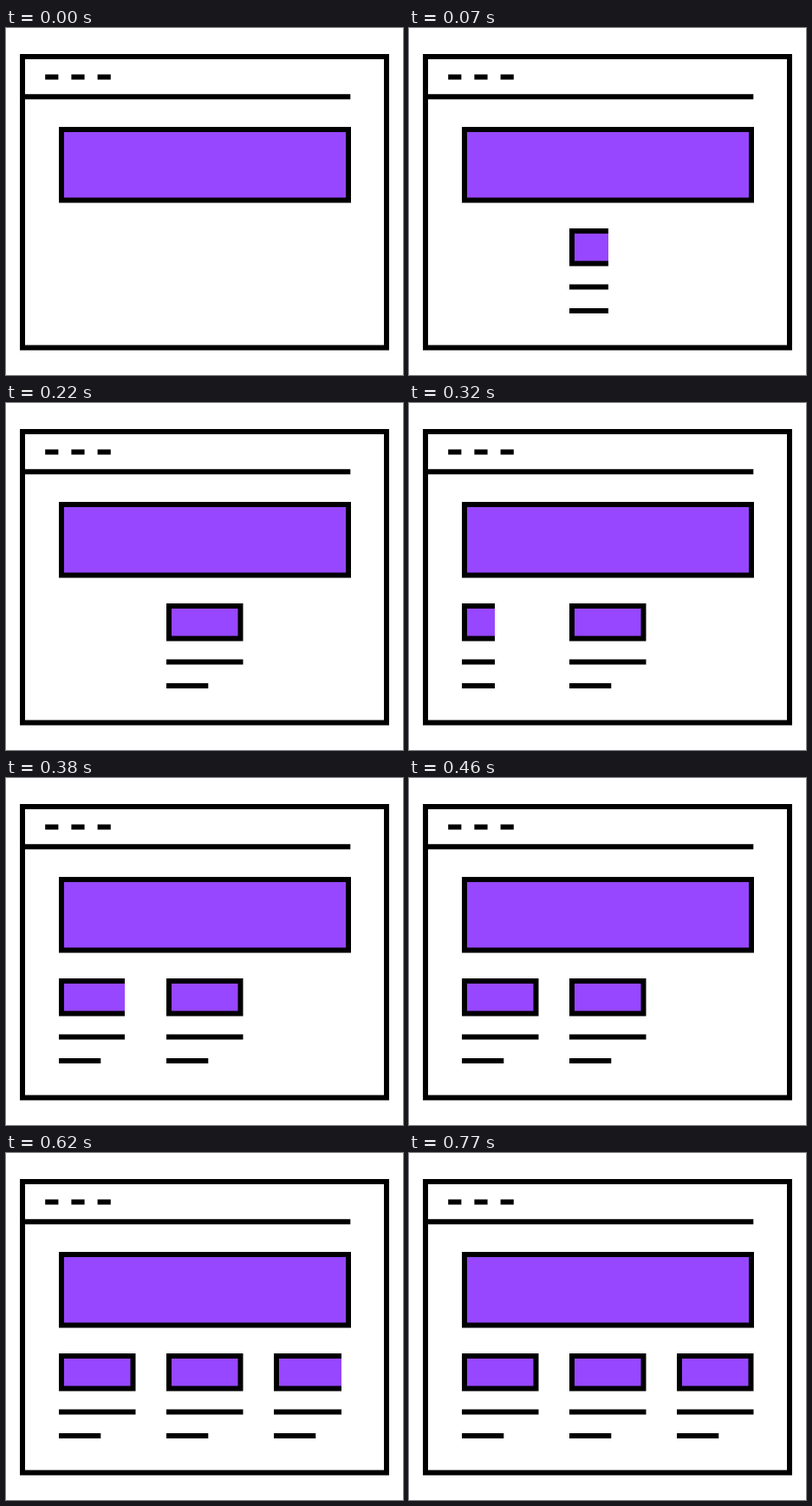
These frames come from a looping animation (458x400 px, 1.77 s). An HTML page:

```html
<!DOCTYPE html>
<html lang="en">
<head>
<meta charset="utf-8">
<title>Page layout building up</title>
<style>
  html, body { margin: 0; width: 100%; height: 100%; overflow: hidden; background: #fff; }
  svg { display: block; width: 458px; height: 400px; }
  .box, .line { stroke: #000; stroke-width: 6; fill: none; }
  .filled { fill: #9747ff; }
</style>
</head>
<body>
<svg viewBox="0 0 458 400">
  <defs>
    <clipPath id="wipe-left"><rect y="225" x="56" height="110"/></clipPath>
    <clipPath id="wipe-middle"><rect y="225" x="180" height="110"/></clipPath>
    <clipPath id="wipe-right"><rect y="225" x="304" height="110"/></clipPath>
    <g id="card">
      <rect class="box filled" x="3" y="234" width="82.5" height="37.5"/>
      <path class="line" d="M0 298.5H88.5M0 326H48.3"/>
    </g>
  </defs>
  <rect class="box" x="19" y="33" width="420" height="335.5"/>
  <path class="line" d="M45.2 56.5h15.2m15 0h15.2m15 0h15.2M20 79.2H397.3"/>
  <rect class="box filled" x="64" y="117" width="331" height="81.5"/>
  <g clip-path="url(#wipe-left)"><use href="#card" x="61"/></g>
  <g clip-path="url(#wipe-middle)"><use href="#card" x="185"/></g>
  <g clip-path="url(#wipe-right)"><use href="#card" x="309"/></g>
</svg>
<script>
  const LOOP = 1770;
  const MARGIN = 5;
  const FULL = 90;

  // Each wipe holds its visible width from the given time until the next step.
  const wipes = {
    middle: [[70, 45], [160, FULL]],
    left: [[320, 38], [380, 76], [460, FULL]],
    right: [[540, 19], [620, 78], [700, FULL]]
  };

  const clips = Object.entries(wipes).map(([name, steps]) => ({
    rect: document.querySelector(`#wipe-${name} rect`),
    steps
  }));

  function widthAt(steps, time) {
    let width = 0;
    for (const [start, value] of steps) if (time >= start) width = value;
    return width && width + MARGIN;
  }

  function render(time) {
    for (const { rect, steps } of clips) rect.setAttribute("width", widthAt(steps, time));
  }

  const begin = performance.now();
  function tick() {
    render((performance.now() - begin) % LOOP);
    requestAnimationFrame(tick);
  }
  tick();
</script>
</body>
</html>
```
